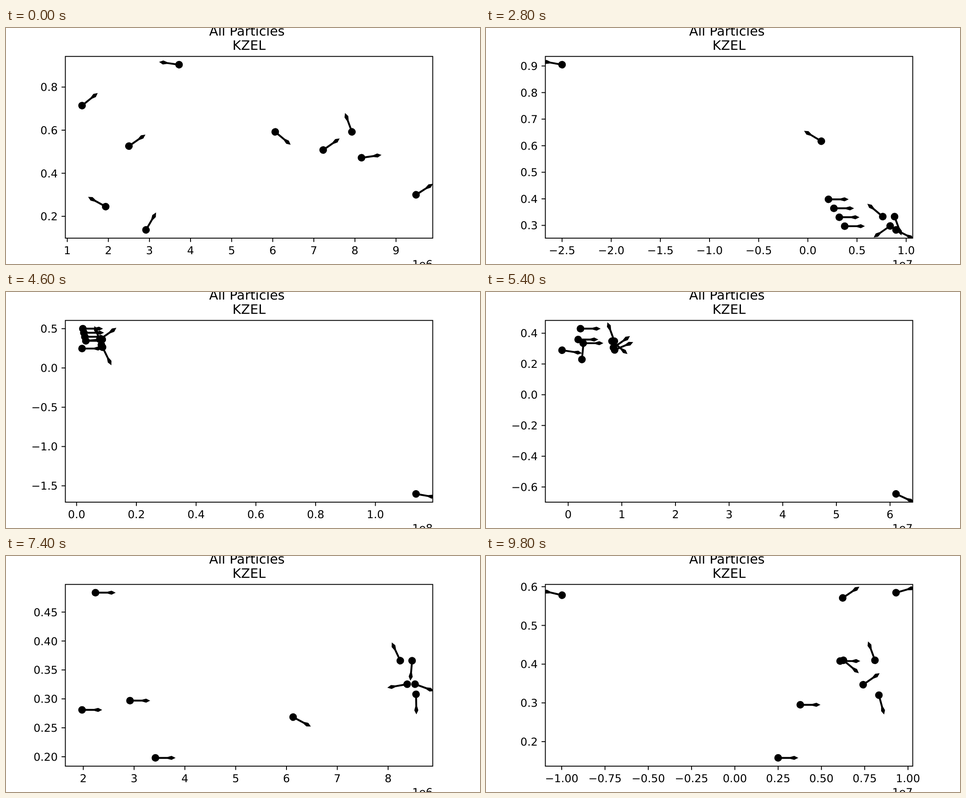
An HTML page for the animation above (10000 ms loop, 1058 px wide and 529 px high).

```html
<!DOCTYPE html>
<html lang="en">
<head>
<meta charset="utf-8">
<title>All Particles</title>
<style>
  html, body { margin: 0; width: 100%; height: 100%; overflow: hidden; background: #fff; }
  svg { display: block; width: 1058px; height: 529px; }
  text { font: 24.3px "DejaVu Sans", sans-serif; text-rendering: geometricPrecision; }
  .title { font-size: 29.2px; text-anchor: middle; }
  .x { text-anchor: middle; }
  .y, .exp { text-anchor: end; }
  .line { fill: none; stroke: #000; stroke-width: 1.94; }
</style>
</head>
<body>
<svg viewBox="0 0 1058 529">
  <clipPath id="box"><rect x="132.5" y="63.7" width="820" height="407.4"/></clipPath>
  <text class="title" x="537.8" y="16.5">All Particles</text>
  <text class="title" x="542.5" y="49">KZEL</text>
  <g id="dots" clip-path="url(#box)"></g>
  <rect class="line" x="132.5" y="63.7" width="820" height="407.4"/>
  <g id="axes"></g>
</svg>
<script>
const STEP = 200, STEPS = 50;
const LEFT = 132.5, RIGHT = 952.5, TOP = 63.7, BOTTOM = 471.1;
const dots = document.getElementById('dots');
const axes = document.getElementById('axes');
const poses = [];

const mix = (a, b, k) => a + (b - a) * k;
const turn = (a, b, k) => a + ((b - a + 540) % 360 - 180) * k;

// A particle is [x in millions, y, heading]; drifters head right.
function pose(step, ...list) {
  const pts = list.map(([x, y, a = 0]) => [x * 1e6, y, a]).sort((p, q) => p[0] - q[0]);
  poses.push({ step, pts });
}

// Drifters evenly spaced along a line.
const row = (n, a, b) => Array.from({ length: n }, (_, i) =>
  a.map((v, j) => mix(v, b[j], i / (n - 1))));

// A swarm: its leader and n followers strung out behind, fanning their headings.
function swarm(lead, n, reach, rise, spin = 0) {
  const pts = [lead];
  for (let k = 1; k <= n; k++) {
    const lift = (n - k) % 2 ? 0.3 : 1;
    pts.push([lead[0] - reach * (k / n) ** 2, lead[1] + rise * lift, 75 * k - 185 + spin]);
  }
  return pts;
}

pose(0, [1.36, 0.714, -39], [2.5, 0.526, -35], [3.72, 0.904, -172], [1.935, 0.245, -151],
  [2.916, 0.137, -60], [9.487, 0.3, -33], ...swarm([8.16, 0.472, -8], 3, 2.1, 0.12));
pose(7, [1.21, 0.459], [2.96, 0.46], [4.31, 0.269], [7.63, 0.32], [4.21, 0.369, 43],
  [4.78, 0.313, 125], [8.72, 0.22, 66], [20.82, -0.044, -178],
  ...swarm([9.32, 0.28, 17], 1, 1.12, 0.03, -52));
pose(14, [-25, 0.905, -170], [1.37, 0.617, -149], ...row(4, [2.1, 0.398], [3.75, 0.297]),
  ...swarm([8.97, 0.283, 27], 3, 1.35, 0.05, 180));
pose(23, [1.83, 0.247], [113.6, -1.603, 10], ...row(4, [2.1, 0.5], [3.1, 0.345]),
  ...swarm([8.69, 0.264, 64], 3, 0.9, 0.1, -75));
pose(31, [-4.11, 0.332, 17], [2.16, 0.411], [2.5, 0.3255], [1.625, 0.218],
  [2.36, 0.0625, -169], ...swarm([8.64, 0.313, 40], 4, 0.08, 0.02));
pose(37, [1.976, 0.281], [2.24, 0.4835], [2.92, 0.297], [3.42, 0.198], [6.13, 0.2685, 28],
  ...swarm([8.55, 0.308, 89], 4, 0.31, 0.058, 130));
pose(49, [-9.98, 0.578, -167], [2.5, 0.158], [3.78, 0.295], [6.08, 0.408], [6.23, 0.571, -34],
  [9.31, 0.5845, -16], ...swarm([8.32, 0.32, 75], 3, 2.05, 0.09));

function particles(step) {
  const i = Math.max(1, poses.findIndex(p => p.step >= step));
  const a = poses[i - 1], b = poses[i];
  const k = (step - a.step) / (b.step - a.step);
  return a.pts.map((p, n) => {
    const q = b.pts[n];
    return [mix(p[0], q[0], k), mix(p[1], q[1], k), turn(p[2], q[2], k)];
  });
}

// Fits an axis to the values with a 5 % margin and picks round ticks.
function fit(values, from, to, bins) {
  const min = Math.min(...values), max = Math.max(...values);
  const pad = (max - min) * 0.05;
  const lo = min - pad, hi = max + pad;
  const raw = (hi - lo) / bins;
  const mag = 10 ** Math.floor(Math.log10(raw));
  const gap = [1, 2, 2.5, 5, 10].find(s => s * mag >= raw) * mag;
  const ticks = [];
  for (let n = Math.ceil(lo / gap); n * gap <= hi; n++) ticks.push(n * gap);

  let exp = Math.floor(Math.log10(Math.max(...ticks.map(Math.abs))));
  if (exp < 6) exp = 0;
  const unit = gap / 10 ** exp;
  let digits = 0;
  while (Math.abs(unit * 10 ** digits - Math.round(unit * 10 ** digits)) > 1e-6) digits++;
  const label = v => {
    const s = Math.abs(v / 10 ** exp).toFixed(digits);
    return v < 0 ? '\u2212' + s : s;
  };
  return { ticks, exp, label, at: v => mix(from, to, (v - lo) / (hi - lo)) };
}

function draw(step) {
  const pts = particles(step);
  const x = fit(pts.map(p => p[0]), LEFT, RIGHT, 9);
  const y = fit(pts.map(p => p[1]), BOTTOM, TOP, 8);

  dots.innerHTML = pts.map(([px, py, a]) =>
    `<g transform="translate(${x.at(px)} ${y.at(py)}) rotate(${a})"><circle r="8.5"/>` +
    '<path d="M0-2.1H27L36-4.5 45 0 36 4.5 27 2.1H0Z"/></g>').join('');

  let out = '';
  for (const v of x.ticks) {
    const p = x.at(v);
    out += `<path class="line" d="M${p} ${BOTTOM}v8.5"/><text class="x" x="${p}" y="507">${x.label(v)}</text>`;
  }
  for (const v of y.ticks) {
    const p = y.at(v);
    out += `<path class="line" d="M${LEFT} ${p}h-8.5"/><text class="y" x="115.5" y="${p + 9}">${y.label(v)}</text>`;
  }
  if (x.exp) out += `<text class="exp" x="${RIGHT}" y="538">1e${x.exp}</text>`;
  axes.innerHTML = out;
}

let shown = -1;
function tick() {
  const step = Math.floor(performance.now() / STEP) % STEPS;
  if (step !== shown) draw(shown = step);
  requestAnimationFrame(tick);
}
tick();
</script>
</body>
</html>
```
